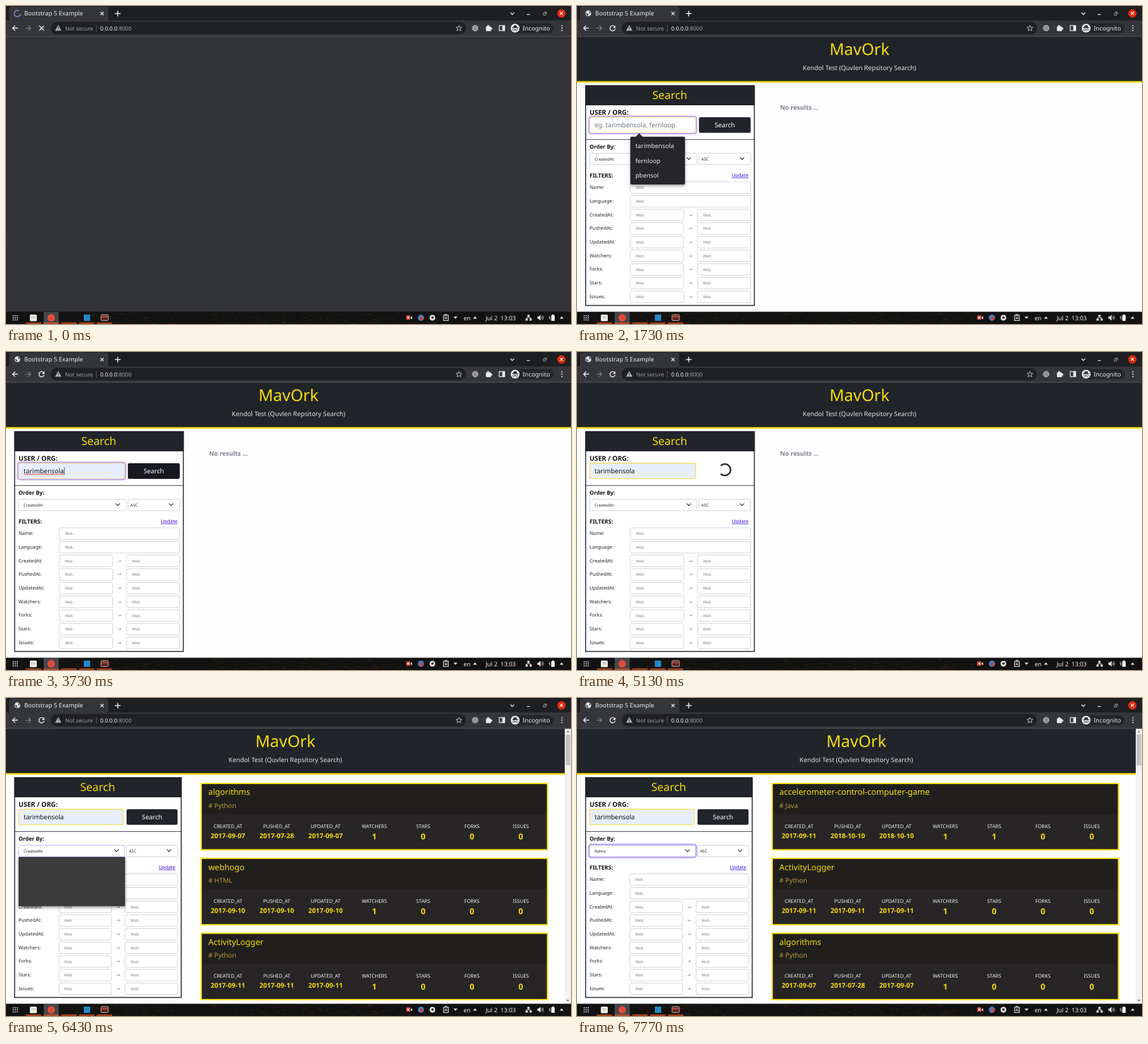
Animation, 900 px wide and 506 px high, one loop 8 s. Source, as an HTML page:

```html
<!DOCTYPE html>
<html lang="en">
<head>
<meta charset="utf-8">
<title>Repository search</title>
<style>
  html, body { margin: 0; width: 100%; height: 100%; overflow: hidden; background: #323337; }
  svg { display: block; width: 900px; height: 506px; }
  text { font-family: "Noto Sans", "Open Sans", sans-serif; white-space: pre; text-rendering: geometricPrecision; }
</style>
</head>
<body>
<svg viewBox="0 0 900 506" xmlns="http://www.w3.org/2000/svg">
  <defs>
    <filter id="shadow" x="-20%" y="-20%" width="140%" height="150%">
      <feDropShadow dx="0" dy="2" stdDeviation="2.5" flood-opacity=".4"/>
    </filter>
  </defs>
  <g id="page"></g>
  <g id="frame"></g>
  <g id="status"></g>
</svg>
<script>
const LOOP = 8000;
const DARK = '#212529', YELLOW = '#f8dd0c', RING = '#bda8f8', FIELD = '#ced4da';
const USER = 'tarimbensola', ORG = 'fernloop', OTHER = 'pbensol';

// Moments of the interaction, in ms
const AT = {
  load: 30, focus: 1130, suggest: 1200, preview: 2330, fill: 2530, hover: 3370, click: 3790,
  wait: 4005, results: 5330, leave: 5930, open: 6430, options: 6470, choose: 7630
};
const OPTION_STEPS = [[0, 0], [6930, 1], [7030, 2], [7100, 3]];
const OPTIONS = ['CreatedAt', 'PushedAt', 'UpdatedAt', 'Name', 'Watchers', 'Forks', 'Stars', 'Issues'];
const FILTERS = ['Name', 'Language', 'CreatedAt', 'PushedAt', 'UpdatedAt', 'Watchers', 'Forks', 'Stars', 'Issues'];
const COLUMNS = ['CREATED_AT', 'PUSHED_AT', 'UPDATED_AT', 'WATCHERS', 'STARS', 'FORKS', 'ISSUES'];

const repo = (name, lang, created, pushed, updated, stars) =>
  ({ name, lang, stats: [created, pushed, updated, 1, stars, 0, 0] });
const algorithms = repo('algorithms', 'Python', '2017-09-07', '2017-07-28', '2017-09-07', 0);
const hugo = repo('webhogo', 'HTML', '2017-09-10', '2017-09-10', '2017-09-10', 0);
const logger = repo('ActivityLogger', 'Python', '2017-09-11', '2017-09-11', '2017-09-11', 0);
const game = repo('accelerometer-control-computer-game', 'Java', '2017-09-11', '2018-10-10', '2018-10-10', 1);

const byId = id => document.getElementById(id);
const ramp = (t, start, length = 150) => {
  const p = Math.min(1, Math.max(0, (t - start) / length));
  return p * p * (3 - 2 * p);
};
const box = (x, y, x2, y2, fill, more = '') =>
  `<rect x="${x}" y="${y}" width="${x2 - x}" height="${y2 - y}" fill="${fill}" ${more}/>`;
const text = (x, y, size, fill, str, more = '') =>
  `<text x="${x}" y="${y}" font-size="${size}" fill="${fill}" ${more}>${str}</text>`;
const line = (d, color, width = 1, more = '') =>
  `<path d="${d}" fill="none" stroke="${color}" stroke-width="${width}" ${more}/>`;
const shape = (d, fill) => `<path d="${d}" fill="${fill}"/>`;
const dot = (x, y, r, fill, more = '') => `<circle cx="${x}" cy="${y}" r="${r}" fill="${fill}" ${more}/>`;
const BOLD = 'font-weight="700"', MEDIUM = 'font-weight="500"', MID = 'text-anchor="middle"';
const stroke = (color, width = 1) => `stroke="${color}" stroke-width="${width}"`;
const field = (x, y, x2, y2, color = FIELD) => box(x, y, x2, y2, '#fff', `rx="2.2" ${stroke(color)}`);
const ring = (x, y, x2, y2, color, alpha) =>
  alpha > 0 ? box(x - 1.2, y - 1.2, x2 + 1.2, y2 + 1.2, 'none', `rx="3.5" opacity="${alpha}" ${stroke(color, 2.6)}`) : '';
const chevron = (x, y) => line(`M${x - 3} ${y - 1.6}l3 3l3 -3`, '#343a40', 1.3, 'stroke-linecap="round"');

const probe = document.createElementNS('http://www.w3.org/2000/svg', 'svg');
probe.setAttribute('style', 'position:absolute;visibility:hidden');
probe.innerHTML = text(0, 0, 10.3, '#000', USER);
document.body.append(probe);
const userWidth = probe.firstChild.getComputedTextLength();
probe.remove();

function drawFrame() {
  const icon = '#e8eaed';
  let s = box(0, 0, 900, 24, '#1e1f22') + box(0, 23, 900, 48, '#35363a') + box(0, 47.5, 900, 49, '#494a4d');
  s += shape('M2 23.5q3 0 3 -4v-14q0 -4.5 4.5 -4.5h149q4.5 0 4.5 4.5v14q0 4 3 4z', '#35363a');
  s += text(29, 15, 9.65, icon, 'Bootstrap 5 Example');
  s += line('M150.5 9.5l5 5m0 -5l-5 5', icon, 1.3) + line('M173.5 12h9m-4.5 -4.5v9', icon, 1.5);
  s += line('M803.5 10.5l3 3l3 -3', icon, 1.3) + line('M829.5 13.5h5', icon, 1.2);
  s += line('M856 11h3.5v3.5h-3.5zM857.5 9.5h3.5v3.5', '#b4b5b8', .8);
  s += dot(884.7, 11.7, 6.7, '#d92a0e') + line('M882.2 9.2l5 5m0 -5l-5 5', '#fff', 1.1);
  s += line('M19 35.3h-8.5m4 -4l-4 4l4 4', icon, 1.4) + line('M31 35.3h8.5m-4 -4l4 4l-4 4', '#7b7c80', 1.3);
  s += box(71, 25.3, 733, 45.3, '#202124', 'rx="10"');
  s += shape('M83.2 30.2l5 9h-10z', '#b0b3b7') + box(82.7, 33.5, 83.7, 36, '#202124') + box(82.7, 36.8, 83.7, 37.8, '#202124');
  s += text(94, 38.5, 8.8, '#9aa0a6', 'Not secure') + box(143.6, 30, 144.4, 41, '#6b6d70');
  s += text(150, 38.5, 8.85, '#f1f3f4', '0.0.0.0<tspan fill="#9aa0a6">:8000</tspan>');
  s += line('M721.5 30.8l1.3 3l3.3 .3l-2.5 2.1l.8 3.2l-2.9 -1.7l-2.9 1.7l.8 -3.2l-2.5 -2.1l3.3 -.3z', '#c5c7ca', 1);
  s += dot(747.3, 35.2, 5, '#a8aaad') + dot(747.3, 35.2, 3.4, '#8e9093');
  s += box(764.5, 32.5, 772.5, 40, icon, 'rx="1"') + dot(768, 32, 1.7, icon) + dot(773, 36, 1.7, icon);
  s += line('M785.7 31.2h8.6v8h-8.6z', icon, 1.2) + box(790.5, 31, 794.5, 39.5, icon);
  s += box(803, 27.3, 872, 43.3, '#25262a', 'rx="8"') + dot(811, 35.3, 7, '#f1f3f4');
  s += shape('M807.8 34l1 -3.2h4.4l1 3.2z', '#303134') + line('M805.7 34.5h10.6', '#303134', 1);
  s += line('M808.7 36.1a1.6 1.6 0 1 0 .1 0m4.4 0a1.6 1.6 0 1 0 .1 0M810.2 37.4h1.6', '#303134', .9);
  s += text(823, 38.6, 9.7, icon, 'Incognito');
  s += [31.5, 35.3, 39].map(y => dot(885.5, y, 1.05, icon)).join('');
  return s + drawTaskbar();
}

function drawTaskbar() {
  let s = box(0, 486.5, 900, 506, '#121212');
  let seed = 7;
  const random = () => (seed = seed * 16807 % 2147483647) / 2147483647;
  for (let i = 0; i < 260; i++) {
    const x = 85 + random() * 560, y = 488 + random() * 17;
    if (x < 263 || x > 323) s += box(x, y, x + 2 + random() * 5, y + 1, i % 3 ? '#2a2010' : '#382909', 'opacity=".7"');
  }
  s += box(60, 487, 84, 506, '#45464a');
  for (let i = 0; i < 9; i++) s += dot(11.5 + i % 3 * 3.2, 493 + Math.floor(i / 3) * 3.2, .95, '#eee');
  for (let i = 0; i < 5; i++) s += box(31.5 + i * 28.3, 503.7, 56 + i * 28.3, 505.5, '#d9501f');
  s += box(38, 491, 49, 501.5, '#f0eee8', 'rx="1.5"') + box(40, 493, 47, 497.5, '#d9d5c8');
  s += dot(72, 496.2, 6, '#df4b3b') + box(124, 491, 134, 501, '#2389cb');
  s += box(151.3, 491, 163, 500.5, '#5b2522', `rx="1.5" ${stroke('#c6b4a9', 1)}`) + box(152.5, 493, 162, 495.5, '#b04b3c');

  const w = '#f0f0f0';
  const up = x => shape(`M${x - 3} 497.5l3 -3.5l3 3.5z`, w);
  s += box(637.5, 492.3, 644, 499.3, '#df493c', 'rx="1"') + shape('M644 496l3 -2.5v5z', '#eee') + dot(640.8, 495.8, 1.5, '#fff');
  s += dot(661, 496, 5, '#3581c6') + dot(662, 497, 2.8, '#d84135');
  s += dot(679.2, 496, 4.5, w) + dot(679.4, 495.7, 2, '#222');
  s += line('M697 492h7.5v8.5h-7.5zM698.8 491h4M698.8 495h4m-4 2.4h4', w, 1.1);
  s += shape('M713 494.3h6l-3 3.5z', w) + text(729, 499.5, 9.3, w, 'en') + up(747);
  s += text(764, 499.5, 9.5, w, 'Jul 2  13:03');
  s += box(830.5, 491.5, 834, 494.5, w) + box(827.5, 497.5, 831, 500.5, w) + box(834, 497.5, 837.5, 500.5, w);
  s += line('M832.2 494v2m-3 2v-2h6.5v2', w, .9);
  s += shape('M846.5 494.3h2l3 -2.8v9l-3 -2.8h-2z', w) + line('M853 493.7q2 2.3 0 4.6m1.5 -6q3.2 3.7 0 7.4', w, .8);
  s += box(868.5, 492, 874, 501, w, 'rx=".8"') + box(870, 490.8, 872.5, 492, w) + line('M866 493l-1 3h2l-1 3', w, .8);
  return s + up(885);
}

function drawStatus(loading) {
  if (loading) {
    return line('M20.5 7.5a5 5 0 1 0 2.5 5', '#8b87d8', 1.5) + line('M53 31.5l7.5 7.5m0 -7.5l-7.5 7.5', '#e8eaed', 1.5);
  }
  return dot(18, 11.7, 4.6, '#e8eaed') + shape('M14.2 10.5l3 1.2l1.2 2.4l-1.2 2q-2.9 -1.4 -3 -4.5zM18.6 8l3.2 1.5l-.6 2.4l-1.8 -.8z', '#5c5e62') +
    line('M60 32.7a4.2 4.2 0 1 0 .8 3.7', '#e8eaed', 1.4) + shape('M61.2 30.7v4.2h-4.2z', '#e8eaed');
}

// Blinking caret: 600 ms on, 600 ms off, restarted when the field is filled
const caretOn = t => t >= AT.focus && t < AT.click &&
  Math.floor((t - (t < AT.fill ? AT.focus : AT.fill)) / 600) % 2 === 0;

function drawUserField(t, right) {
  const filled = t >= AT.preview;
  const focus = ramp(t, AT.focus) * (1 - ramp(t, AT.click));
  let s = ring(20, 177, right, 201.7, RING, focus);
  s += box(20, 177, right, 201.7, filled ? '#e8edfb' : '#fff', `rx="2.2" ${stroke('#f2df68', 1.3)} ${focus > .5 ? 'stroke-dasharray="1.5 1.2"' : ''}`);
  s += filled ? text(28, 193, 10.3, '#111', USER) : text(28, 193, 10.3, '#6c757d', `eg. ${USER}, ${ORG}`);
  if (t >= AT.fill && t < AT.click) s += line(`M28 194.8h${userWidth}`, '#e2373d', 1);
  if (caretOn(t)) {
    const x = 28.3 + (filled ? userWidth : 0);
    s += box(x, 183.3, x + .8, 195.5, '#111');
  }
  return s;
}

function drawButton(t, left, right) {
  const cx = (left + right) / 2;
  if (t >= AT.wait && t < AT.results) {
    const turn = (t - AT.wait) / 750 % 1 * 360;
    return line('M6.5 6.5A9.2 9.2 0 1 1 6.5 -6.5', DARK, 2.5, `transform="translate(${cx} 187.4) rotate(${turn})"`);
  }
  const hover = ramp(t, AT.hover) * (1 - ramp(t, AT.leave));
  return (t < AT.wait ? ring(left, 177, right, 201.7, '#a0a2a4', ramp(t, AT.click)) : '') +
    box(left, 177, right, 201.7, DARK, 'rx="2.5"') +
    box(left, 177, right, 201.7, '#17181f', `rx="2.5" opacity="${hover}"`) +
    text(cx, 193, 10.3, '#fff', 'Search', MID);
}

function drawForm(t, scale) {
  const fit = x => 20 + (x - 20) * scale;
  const panelRight = fit(282.5), end = fit(276.6);
  let s = box(13.7, 126.7, panelRight, 476.5, '#fff', stroke(DARK, 1.5)) + box(13, 126, panelRight + .7, 158, DARK);
  s += text((13 + panelRight) / 2, 148.2, 17.6, YELLOW, 'Search', `${MID} ${MEDIUM}`);
  s += text(20, 172.6, 10.5, '#111', 'USER / ORG:', BOLD);
  s += drawUserField(t, fit(189)) + drawButton(t, fit(194.3), end);
  s += box(14, 212, panelRight, 212.9, '#33373b') + text(20, 227.2, 8.7, '#111', 'Order By:', BOLD);

  const chosen = t >= AT.choose ? 'Name' : 'CreatedAt';
  s += field(fit(194.3), 234.3, end, 252.6) + text(fit(198), 245.8, 6.5, DARK, 'ASC') + chevron(fit(263), 243);
  s += ring(20, 234.3, fit(191), 252.6, RING, ramp(t, AT.open));
  s += field(20, 234.3, fit(191), 252.6, t > AT.open ? '#c4b2f5' : FIELD);
  s += text(28, 245.8, 6.5, DARK, chosen) + chevron(fit(178), 243);
  s += text(20, 272.6, 9.1, '#111', 'FILTERS:', BOLD);
  s += text(fit(273), 272, 7.7, '#3a0bd8', 'Update', 'text-anchor="end" text-decoration="underline"');

  FILTERS.forEach((name, i) => {
    const y = 289 + i * 21.7;
    const input = (a, b) => field(fit(a), y - 9.2, fit(b), y + 9.2) + text(fit(93.7 + a - 85), y + 2.3, 6.2, '#7b8288', 'Web');
    s += text(20, y + 2.2, 7.7, DARK, name + ':');
    s += i < 2 ? input(85, 276.6) : input(85, 170) + text(fit(181), y + 2.2, 6.2, DARK, '-&gt;', MID) + input(192, 276.6);
  });
  return s;
}

function drawSuggestions(t) {
  let s = box(85, 208, 172, 284, '#27282b', 'rx="2" filter="url(#shadow)"') + shape('M93.5 208l5.5 -5.5l5.5 5.5z', '#27282b');
  if (t >= AT.preview) s += box(85, 210.3, 172, 234, '#47484c');
  return s + [USER, ORG, OTHER].map((name, i) => text(93, 225.8 + i * 23.7, 9.9, '#ececec', name)).join('');
}

function drawOptions(t) {
  let s = box(20, 253, 189.7, 331.3, '#3b3b3b', 'filter="url(#shadow)"');
  if (t < AT.options) return s;
  const current = OPTION_STEPS.filter(([start]) => t >= start).pop()[1];
  s += box(20, 253 + current * 9.78, 189.7, 262.8 + current * 9.78, '#626262');
  return s + OPTIONS.map((name, i) => text(28, 260.2 + i * 9.78, 6.5, '#fff', name)).join('');
}

function drawCard({ name, lang, stats }, i) {
  const y = 135 + i * 119.2;
  let s = box(311, y + 1, 862.5, y + 106.5, '#272525') + box(311, y + 1, 862.5, y + 49.5, '#201f1d');
  s += box(311, y + 1, 862.5, y + 106.5, 'none', stroke(YELLOW, 2));
  s += text(322.3, y + 19.3, 13.1, YELLOW, name, MEDIUM) + text(322.3, y + 39.6, 10.5, '#b99b35', '# ' + lang, MEDIUM);
  COLUMNS.forEach((label, c) => {
    const x = 353.5 + c * 77.75;
    s += text(x, y + 71.7, 7.9, '#f4f4f4', label, MID);
    s += text(x, y + (c < 3 ? 87.5 : 90.2), c < 3 ? 10.5 : 13, YELLOW, stats[c], `${MID} ${BOLD}`);
  });
  return s;
}

function drawScrollbar() {
  return box(890, 49, 900, 487, '#f1f1f1') + box(891.3, 58, 898.8, 107, '#c1c1c1') +
    shape('M892.7 54.7l2.3 -2.7l2.3 2.7z', '#777') + shape('M892.7 480.3h4.6l-2.3 2.7z', '#777');
}

function drawPage(t) {
  if (t < AT.load) return box(0, 48, 900, 487, '#323337') + box(0, 372.6, 900, 373.3, '#3a3b3e');
  const done = t >= AT.results;
  const width = done ? 890 : 900;
  let s = box(0, 48, 900, 487, '#fefefe') + box(0, 48, width, 120, DARK) + box(0, 119.5, width, 122, YELLOW);
  s += text(width / 2, 78.3, 25.8, YELLOW, 'MavOrk', `${MID} ${MEDIUM}`);
  s += text(width / 2, 102.2, 10.2, '#e3e4e5', 'Kendol Test (Quvlen Repsitory Search)', MID);
  s += drawForm(t, done ? .987 : 1);
  if (done) {
    const repos = t < AT.choose ? [algorithms, hugo, logger] : [game, logger, algorithms];
    s += repos.map(drawCard).join('') + drawScrollbar();
  } else {
    s += text(323.5, 165.2, 9.9, '#7b828a', 'No results ...', BOLD);
  }
  if (t >= AT.suggest && t < AT.fill) s += drawSuggestions(t);
  if (t >= AT.open && t < AT.choose) s += drawOptions(t);
  return s;
}

const shown = {};
function put(id, markup) {
  if (shown[id] !== markup) byId(id).innerHTML = shown[id] = markup;
}

function render(t) {
  put('page', drawPage(t));
  put('status', drawStatus(t < AT.load));
}

put('frame', drawFrame());
const start = performance.now();
(function tick() {
  render((performance.now() - start) % LOOP);
  requestAnimationFrame(tick);
})();
</script>
</body>
</html>
```
